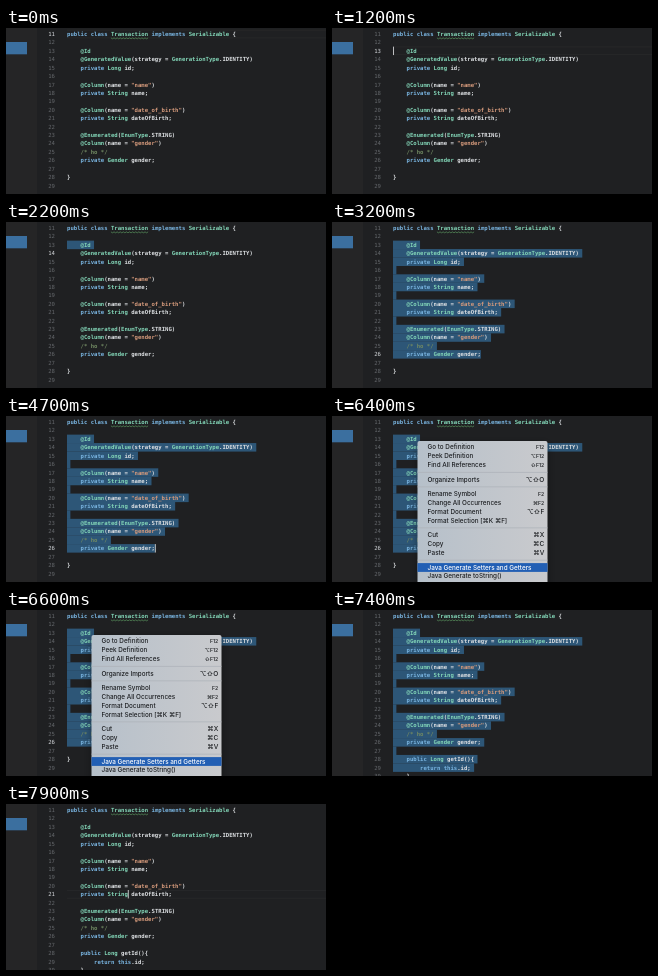
An HTML page with a canvas for the animation above (8000 ms loop, 320 by 166 pixels).

```html
<!DOCTYPE html>
<html lang="en">
<head>
<meta charset="utf-8">
<style>
  html, body { margin: 0; width: 100%; height: 100%; overflow: hidden; background: #1f2022; }
  canvas { display: block; width: 100vw; height: 100vh; }
</style>
</head>
<body>
<canvas id="stage"></canvas>
<script>
const W = 320, H = 166, LOOP = 8000;
const FIRST = 11, ROW = 8.42, TOP = 1.8, LEFT = 61, CHAR = 3.38;
const MONO = '"DejaVu Sans Mono", monospace';
const MENU_FONT = '"Inter", sans-serif';
const KEY_FONT = '"Inter", "DejaVu Sans", sans-serif';

const canvas = document.getElementById('stage');
const ctx = canvas.getContext('2d');

const COLORS = {
  back: '#1f2022', side: '#252526', item: '#3b6f9f',
  number: '#64676b', active: '#d5d8dc', select: '#2d5677',
  plain: '#dcdfe2', keyword: '#79b4e0', type: '#83d6b8',
  text: '#d69a7c', comment: '#728a63', border: '#2b2b2c'
};

const BASE = [
  'public class Transaction implements Serializable {',
  '',
  '    @Id',
  '    @GeneratedValue(strategy = GenerationType.IDENTITY)',
  '    private Long id;',
  '',
  '    @Column(name = "name")',
  '    private String name;',
  '',
  '    @Column(name = "date_of_birth")',
  '    private String dateOfBirth;',
  '',
  '    @Enumerated(EnumType.STRING)',
  '    @Column(name = "gender")',
  '    /* ho */',
  '    private Gender gender;',
  ''
];
const BEFORE = [...BASE, '}', ''];
const AFTER = [...BASE, '    public Long getId(){', '        return this.id;', '    }'];

const TOKEN = /\/\*.*?\*\/|"[^"]*"|@?\w+|\s+|./g;
const KEYWORDS = /^(public|class|implements|private|return|this)$/;
const TYPES = /^(@\w+|[A-Z][a-z]\w*)$/;

const MENU = { x: 85.5, y: 25, w: 130, h: 160 };
const ITEMS = [
  ['Go to Definition', 'F12', 31.3], ['Peek Definition', '⌥F12', 40.2],
  ['Find All References', '⇧F12', 49], ['Organize Imports', '⌥⇧O', 63.6],
  ['Rename Symbol', 'F2', 78], ['Change All Occurrences', '⌘F2', 87],
  ['Format Document', '⌥⇧F', 95.8], ['Format Selection [⌘K ⌘F]', '', 104.5],
  ['Cut', '⌘X', 119.2], ['Copy', '⌘C', 128], ['Paste', '⌘V', 136.7],
  ['Java Generate Setters and Getters', '', 151.5], ['Java Generate toString()', '', 160.2]
];
const RULES = [56.3, 70.9, 111.9, 144.1];

// [start ms, hovered item]
const HOVER = [[4800, -1], [5000, 0], [5100, 2], [5200, 3], [5300, 4], [5400, 5],
  [5600, 6], [5700, 7], [5800, 8], [5900, 10], [6000, 11]];

// [start ms, active line, last selected line]
const STATES = [[0, 11, 0], [1100, 13, 0], [1500, 14, 13], [2600, 17, 16],
  [2700, 20, 19], [2800, 23, 22], [2900, 26, 26], [7300, 0, 29], [7600, 21, 0]];

// [from, to, line, column]
const CARETS = [[100, 600, 11, 0], [1100, 1500, 13, 0], [1700, 2100, 14, 0],
  [2900, 3200, 26, 26], [3800, 4300, 26, 26], [4700, 7300, 26, 26], [7600, 8000, 21, 18]];

const current = (list, t) => list.filter(e => e[0] <= t).pop();
const rowTop = line => TOP + (line - FIRST) * ROW;

function rect(x, y, w, h, color) {
  ctx.fillStyle = color;
  ctx.fillRect(x, y, w, h);
}

function label(str, x, y, color, align = 'left') {
  ctx.fillStyle = color;
  ctx.textAlign = align;
  ctx.fillText(str, x, y);
}

function tokenColor(word) {
  if (word.startsWith('/*')) return COLORS.comment;
  if (word[0] === '"') return COLORS.text;
  if (KEYWORDS.test(word)) return COLORS.keyword;
  return TYPES.test(word) ? COLORS.type : COLORS.plain;
}

function drawCode(lines, active, lastSelected) {
  ctx.textBaseline = 'alphabetic';
  lines.forEach((str, i) => {
    const line = FIRST + i, y = rowTop(line), base = y + 6.2;
    if (line >= 13 && line <= lastSelected) {
      const newline = line === 26 && active === 26 ? 0 : 1;
      rect(LEFT, y, (str.length + newline) * CHAR, ROW + 0.1, COLORS.select);
    }
    ctx.font = `5.61px ${MONO}`;
    label(line, 49, base, line === active ? COLORS.active : COLORS.number, 'right');
    ctx.font = `bold 5.61px ${MONO}`;
    for (const m of str.matchAll(TOKEN)) {
      if (m[0].trim()) label(m[0], LEFT + m.index * CHAR, base, tokenColor(m[0]));
    }
  });
}

function drawSquiggle() {
  ctx.strokeStyle = '#63a869';
  ctx.lineWidth = 0.6;
  ctx.beginPath();
  for (let i = 0; i <= 24; i++) {
    ctx.lineTo(LEFT + CHAR * (13 + i * 11 / 24), 9.9 + (i % 2) * 0.9);
  }
  ctx.stroke();
}

function drawMenu(hovered) {
  const fill = ctx.createLinearGradient(MENU.x, 0, MENU.x + MENU.w, 0);
  fill.addColorStop(0, '#b6c0ca');
  fill.addColorStop(1, '#c9cacd');
  ctx.save();
  ctx.shadowColor = 'rgba(0,0,0,.4)';
  ctx.shadowBlur = 8 * canvas.width / W;
  ctx.shadowOffsetY = 3 * canvas.width / W;
  ctx.fillStyle = fill;
  ctx.beginPath();
  ctx.roundRect(MENU.x, MENU.y, MENU.w, MENU.h, 2);
  ctx.fill();
  ctx.restore();

  RULES.forEach(y => rect(MENU.x, y - 0.4, MENU.w, 0.8, '#aeb3b9'));
  ctx.textBaseline = 'middle';
  ITEMS.forEach(([name, keys, y], i) => {
    const on = i === hovered, color = on ? '#fff' : '#1d1f22';
    if (on) rect(MENU.x, y - 4.4, MENU.w, 8.8, '#225fb4');
    ctx.font = `500 6.33px ${MENU_FONT}`;
    label(name, 95.5, y + 0.2, color);
    ctx.font = `500 ${/F\d/.test(keys) ? 5.2 : 6.5}px ${KEY_FONT}`;
    label(keys, 212.3, y + 0.2, color, 'right');
  });
}

function draw(t) {
  const [, active, lastSelected] = current(STATES, t);
  rect(0, 0, W, H, COLORS.back);
  rect(0, 0, 31, H, COLORS.side);
  rect(0, 14, 21, 12.3, COLORS.item);

  if (active && !lastSelected) {
    const y = rowTop(active);
    rect(LEFT, y, W - LEFT, 0.6, COLORS.border);
    rect(LEFT, y + ROW - 0.6, W - LEFT, 0.6, COLORS.border);
  }
  drawCode(t < 7300 ? BEFORE : AFTER, active, lastSelected);
  drawSquiggle();

  const caret = CARETS.find(([from, to]) => t >= from && t < to);
  if (caret) rect(LEFT + caret[3] * CHAR, rowTop(caret[2]), 0.8, ROW, '#e6e8ea');
  if (t >= 4800 && t < 7300) drawMenu(current(HOVER, t)[1]);
}

function frame() {
  const scale = window.devicePixelRatio || 1;
  const w = Math.round(innerWidth * scale), h = Math.round(innerHeight * scale);
  if (canvas.width !== w || canvas.height !== h) {
    canvas.width = w;
    canvas.height = h;
  }
  ctx.setTransform(w / W, 0, 0, h / H, 0, 0);
  draw(performance.now() % LOOP);
  requestAnimationFrame(frame);
}
frame();
</script>
</body>
</html>
```
